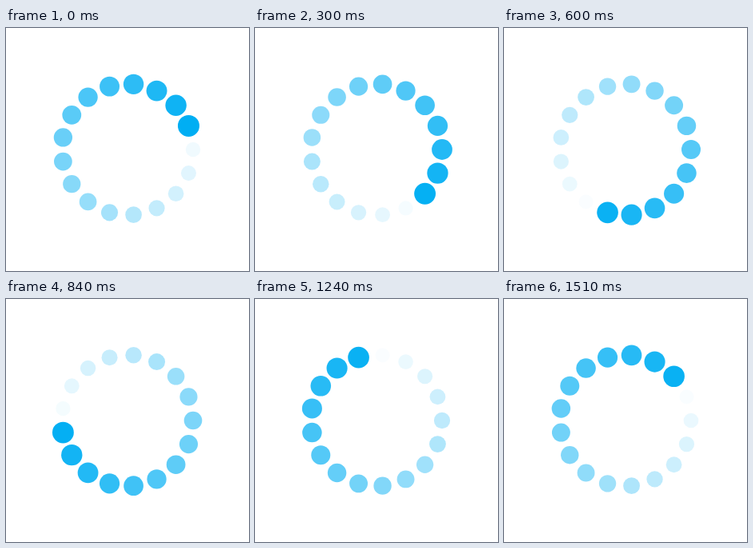
Write an HTML page with a canvas that moves like this. It is 304 px wide and 304 px high and loops after 1.54 s.

```html
<!DOCTYPE html>
<html lang="en">
<head>
<meta charset="utf-8">
<title>Loading spinner</title>
<style>
  html, body { margin: 0; height: 100%; overflow: hidden; background: #fff; }
  canvas { display: block; width: 304px; height: 304px; }
</style>
</head>
<body>
<canvas width="304" height="304"></canvas>
<script>
  const ctx = document.querySelector('canvas').getContext('2d');
  const LOOP = 1540, STEPS = 46, DOTS = 17, CENTER = 152, RING = 82;

  function draw(time) {
    // The spinner advances in even steps, rounded to slightly early ticks.
    const step = Math.floor((time % LOOP + 6) / LOOP * STEPS) % STEPS;
    ctx.clearRect(0, 0, 304, 304);
    ctx.fillStyle = '#00aef3';
    for (let i = 0; i < DOTS; i++) {
      const angle = i / DOTS * 2 * Math.PI;
      // Each dot pops to full size in turn, then shrinks and fades.
      const age = (step / STEPS + 1 - (i + 1) / DOTS) % 1;
      ctx.globalAlpha = 1 - age;
      ctx.beginPath();
      ctx.arc(CENTER + RING * Math.cos(angle), CENTER + RING * Math.sin(angle),
        13.5 - 4.5 * age, 0, 2 * Math.PI);
      ctx.fill();
    }
  }

  function tick() {
    draw(performance.now());
    requestAnimationFrame(tick);
  }
  tick();
</script>
</body>
</html>
```
